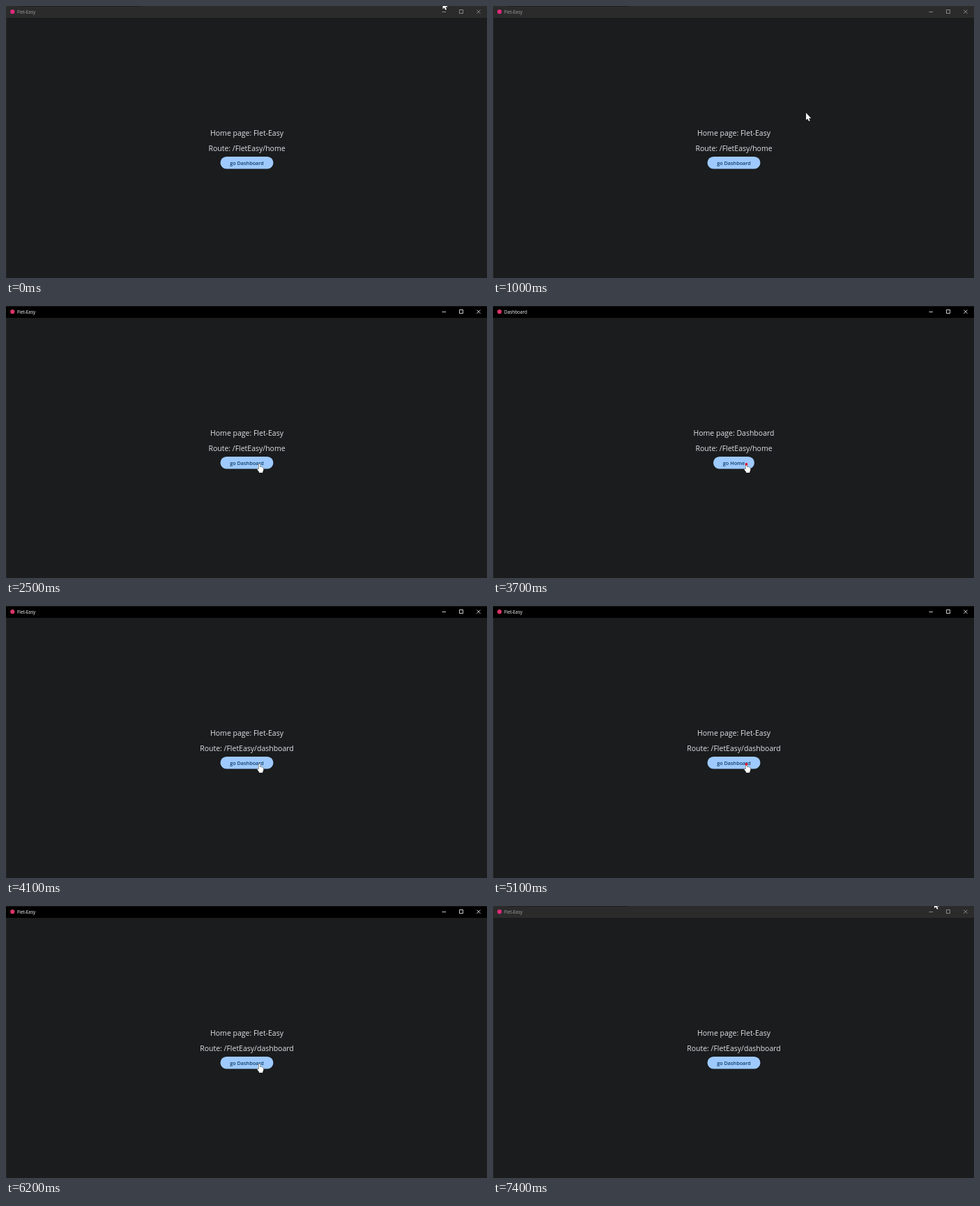
An HTML page with a canvas that plays this animation: 690x390 px, repeating every 7.5 s.

```html
<!DOCTYPE html>
<html lang="en">
<head>
<meta charset="utf-8">
<title>Flet-Easy</title>
<style>
html, body { margin: 0; width: 100%; height: 100%; overflow: hidden; background: #1a1c1e; }
canvas { display: block; width: 690px; height: 390px; }
</style>
</head>
<body>
<canvas id="stage" width="690" height="390"></canvas>
<script>
const ctx = document.getElementById('stage').getContext('2d');
const W = 690, H = 390, LOOP = 7500, STEP = 100;
const BAR = 17, MID = 345.5, SURFACE = '#1a1c1e';
const FONT = '"Open Sans", "Noto Sans", sans-serif';

const page = (name, route, button, width) => ({ name, route, button, width });
const dashboard = page('Dashboard', 'home', 'go Home', 59);
const homeAgain = page('Flet-Easy', 'dashboard', 'go Dashboard', 76);
const pages = [page('Flet-Easy', 'home', 'go Dashboard', 76), dashboard, homeAgain, dashboard, homeAgain];
const clicks = [2600, 3700, 5100, 5800];
const CLICK_DELAY = 100, TRANSITION = 300;

// Cursor stops: time, x, y of the tip
const stops = [
  [500, 626.5, -6], [1300, 367, 227], [1400, 367, 231], [1600, 367, 231],
  [1900, 363.5, 226], [6200, 363.5, 226], [6500, 564, 14], [7100, 633, -7]
];

const clamp = v => Math.max(0, Math.min(1, v));
const smooth = v => v * v * (3 - 2 * v);
const mix = (a, b, v) => a + (b - a) * v;

function cursorAt(t) {
  const i = stops.findIndex(s => s[0] >= t);
  if (i === 0) return stops[0].slice(1);
  if (i < 0) return stops[stops.length - 1].slice(1);
  const [t0, x0, y0] = stops[i - 1], [t1, x1, y1] = stops[i];
  const v = smooth((t - t0) / (t1 - t0));
  return [mix(x0, x1, v), mix(y0, y1, v)];
}

function text(str, x, y, size, color, align = 'left', weight = 400) {
  ctx.font = `${weight} ${size}px ${FONT}`;
  ctx.textAlign = align;
  ctx.fillStyle = color;
  ctx.fillText(str, x, y);
}

function drawPage(p, scale = 1, alpha = 1) {
  const cy = (BAR + H) / 2;
  ctx.save();
  ctx.beginPath();
  ctx.rect(0, BAR, W, H - BAR);
  ctx.clip();
  ctx.globalAlpha = alpha;
  ctx.translate(MID, cy);
  ctx.scale(scale, scale);
  ctx.translate(-MID, -cy);
  ctx.fillStyle = SURFACE;
  ctx.fillRect(0, BAR, W, H - BAR);
  text(`Home page: ${p.name}`, MID, 186, 10.5, '#e2e2e5', 'center', 500);
  text(`Route: /FletEasy/${p.route}`, MID, 207.5, 10.5, '#e2e2e5', 'center', 500);
  ctx.fillStyle = '#9ecaff';
  ctx.beginPath();
  ctx.roundRect(MID - p.width / 2, 216, p.width, 17.6, 8.8);
  ctx.fill();
  text(p.button, MID, 228.4, 7.25, '#0d3c66', 'center', 600);
  ctx.restore();
}

function drawBar(name, active, hover) {
  const ink = active ? '#fff' : '#a0a0a0';
  ctx.fillStyle = active ? '#000' : '#2b2b2b';
  ctx.fillRect(0, 0, W, BAR);
  if (hover) {
    ctx.fillStyle = active ? '#1c1c1c' : '#363636';
    ctx.fillRect(616, 0, 24, BAR);
  }
  // Window edge, with a sliver of the window behind it
  ctx.fillStyle = active ? '#141414' : '#1f1f1f';
  ctx.fillRect(active ? 0 : 22, 0, active ? W : 172, 1);

  ctx.fillStyle = active ? '#d93468' : '#e02a78';
  ctx.beginPath();
  ctx.arc(9.3, 8.2, 3.1, 0, Math.PI * 2);
  ctx.fill();
  text(name, 16, 10.9, 6.4, ink);

  ctx.strokeStyle = ink;
  ctx.lineWidth = 0.8;
  ctx.beginPath();
  ctx.moveTo(625.5, 8.5);
  ctx.lineTo(631, 8.5);
  ctx.rect(650.5, 5.5, 5, 5);
  ctx.moveTo(675.3, 5.6);
  ctx.lineTo(680.5, 10.8);
  ctx.moveTo(680.5, 5.6);
  ctx.lineTo(675.3, 10.8);
  ctx.stroke();
}

const arrow = new Path2D('M0 0V10.3L2.3 8.2L3.9 11.8L5.6 11.1L4 7.6H7.2Z');
const hand = new Path2D('M-1 1Q0 -.5 1 1V5Q2 4.2 2.7 5.3Q3.8 4.6 4.4 5.7Q5.6 5.2 5.8 6.6V9Q5.6 10.8 4.7 11.5V13H-.4V12L-3 8.5Q-3.2 6.9 -1.9 7.4L-1 8.2Z');

function drawCursor(x, y, shape) {
  ctx.save();
  ctx.translate(x, y);
  ctx.lineWidth = 0.9;
  ctx.lineJoin = 'round';
  ctx.strokeStyle = '#222';
  ctx.fillStyle = '#fff';
  ctx.stroke(shape);
  ctx.fill(shape);
  ctx.restore();
}

function draw(t) {
  const shown = clicks.filter(c => t >= c + CLICK_DELAY).length;
  const current = pages[shown];
  const v = shown ? clamp((t - clicks[shown - 1] - CLICK_DELAY) / TRANSITION) : 1;
  const [x, y] = cursorAt(t);
  const active = t >= 2500 && t < 7400;

  if (v < 1) {
    const eased = 1 - (1 - v) ** 3;
    drawPage(pages[shown - 1], 1 + 0.05 * eased);
    drawPage(current, mix(0.85, 1, eased), clamp(v * 2.5));
  } else {
    drawPage(current);
  }
  drawBar(current.name, active, x >= 616 && x < 640 && y >= 0 && y < BAR);
  ctx.fillStyle = '#25272a';
  ctx.fillRect(0, BAR, 1, H - BAR);

  const overButton = Math.abs(x - MID) < current.width / 2 && y >= 216 && y < 234;
  drawCursor(x, y, overButton ? hand : arrow);
  if (clicks.some(c => t >= c && t < c + 200)) {
    ctx.fillStyle = '#e3122b';
    ctx.beginPath();
    ctx.arc(x, y + 0.9, 1.9, 0, Math.PI * 2);
    ctx.fill();
  }
}

const start = performance.now();
function tick() {
  const t = (performance.now() - start) % LOOP;
  draw(Math.floor(t / STEP) * STEP);
  requestAnimationFrame(tick);
}
tick();
</script>
</body>
</html>
```
